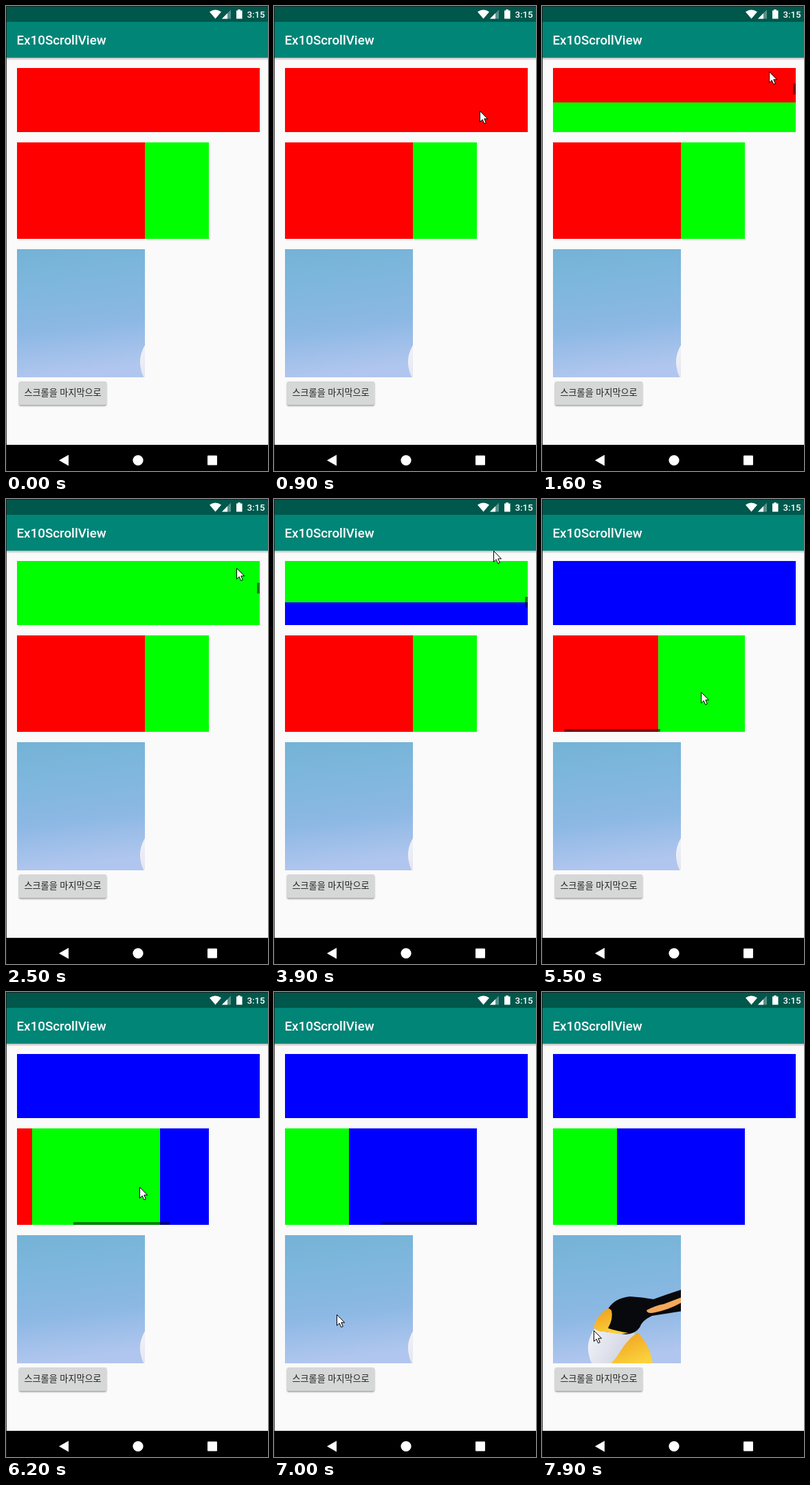
An HTML page for the animation above (8000 ms loop, 381x675 px).

```html
<!DOCTYPE html>
<html lang="ko">
<head>
<meta charset="utf-8">
<title>Scroll views</title>
<style>
html, body { margin: 0; width: 100%; height: 100%; overflow: hidden; background: #fafafa; }
svg { display: block; }
.ui { font-family: Roboto, "Noto Sans", sans-serif; font-weight: 500; fill: #fff; }
.ko { font-family: "Noto Sans CJK KR", "Noto Sans CJK", "Noto Sans CJK JP", sans-serif; fill: #212121; }
</style>
</head>
<body>
<svg id="stage" width="381" height="675" viewBox="0 0 381 675">
  <defs>
    <linearGradient id="drop" x2="0" y2="1">
      <stop stop-color="#000" stop-opacity=".26"/>
      <stop offset="1" stop-color="#000" stop-opacity="0"/>
    </linearGradient>
    <linearGradient id="sky" x2=".12" y2="1">
      <stop stop-color="#74b3d6"/>
      <stop offset=".35" stop-color="#80b7de"/>
      <stop offset=".65" stop-color="#8cb8e4"/>
      <stop offset="1" stop-color="#b0c6ee"/>
    </linearGradient>
    <linearGradient id="chest" x2="1" y2=".3">
      <stop stop-color="#f4f5fa"/>
      <stop offset="1" stop-color="#c3c7d8"/>
    </linearGradient>
    <linearGradient id="gold" x2=".5" y2="1">
      <stop stop-color="#ee9a1c"/>
      <stop offset="1" stop-color="#fbd13c"/>
    </linearGradient>
    <filter id="soft" x="-10%" y="-30%" width="120%" height="170%">
      <feGaussianBlur stdDeviation="1.1"/>
    </filter>
  </defs>

  <rect width="381" height="675" fill="#fafafa"/>
  <rect y="75" width="381" height="4" fill="url(#drop)"/>
  <rect width="381" height="23" fill="#00574b"/>
  <rect y="23" width="381" height="52" fill="#008577"/>
  <text class="ui" x="15.5" y="56" font-size="18.8">Ex10ScrollView</text>

  <g fill="#fff">
    <path d="M296 8.6Q304.5 2.4 313 8.6L304.5 18.5Z"/>
    <path d="M314 18.5H327V5.5Z" opacity=".35"/>
    <path d="M314 18.5H322V10.5Z"/>
    <path d="M335 6.5H337.3V5H340.7V6.5H343.5V18.5H335Z"/>
  </g>
  <text class="ui" x="350.5" y="17" font-size="13.2">3:15</text>

  <svg x="16" y="90" width="353" height="93">
    <g id="column">
      <rect width="353" height="186" fill="#f00"/>
      <rect y="186" width="353" height="186" fill="#0f0"/>
      <rect y="372" width="353" height="186" fill="#00f"/>
    </g>
    <rect id="barV" x="349" width="4" height="15.5"/>
  </svg>

  <svg x="16" y="198" width="279" height="140">
    <g id="row">
      <rect width="186" height="140" fill="#f00"/>
      <rect x="186" width="186" height="140" fill="#0f0"/>
      <rect x="372" width="186" height="140" fill="#00f"/>
    </g>
    <rect id="barH" y="136" width="139.5" height="4"/>
  </svg>

  <svg x="16" y="353" width="186" height="186">
    <rect width="186" height="186" fill="url(#sky)"/>
    <g id="photo">
      <g transform="translate(112 -353)">
        <path d="M78 486Q66 503 67 519Q68 532 74 542H165L132 492Z" fill="url(#chest)"/>
        <path d="M139 494Q124 505 115 520Q108 532 98 542H161Q159 515 139 494Z" fill="url(#gold)"/>
        <path d="M96 460Q106 444 128 442Q146 443 162 446Q184 438 206 431V463Q180 467 160 470Q145 477 142 487Q136 496 122 497L84 492Z" fill="#08090c"/>
        <path d="M97 459Q80 468 75 487Q80 494 92 493Q110 498 126 495Q108 492 96 488Q104 474 101 462Z" fill="url(#gold)"/>
        <path d="M152 462Q165 455 177 453L206 442V449Q186 461 165 465Q153 468 152 462Z" fill="#f4a85a"/>
      </g>
    </g>
  </svg>

  <rect x="19" y="546.5" width="127" height="34" rx="2" opacity=".4" filter="url(#soft)"/>
  <rect x="19" y="545" width="127" height="34" rx="2" fill="#d6d7d7"/>
  <text class="ko" x="26.5" y="566" font-size="13.1">스크롤을 마지막으로</text>

  <rect y="637" width="381" height="38"/>
  <g fill="#fff">
    <path d="M77 659.5L91 651.5V667.5Z"/>
    <circle cx="192" cy="659.5" r="7.6"/>
    <rect x="293" y="652.5" width="14" height="14" rx="1"/>
  </g>
  <path d="M.5 0V675M0 .5H381" stroke="#1a1a1a" opacity=".85"/>

  <path id="cursor" d="M.5 .5V16.2L4.1 12.8L6.7 18.6L9.3 17.5L6.8 11.8H11.6Z" fill="#fff" stroke="#000"/>
</svg>
<script>
const LOOP = 8000, STEP = 100;

// Pointer stops: time, x, y and the view dragged on the way there, if any.
const stops = [
  [100, 345, 140],
  [600, 291, 174],
  [900, 299, 152],
  [1100, 308, 91, "column"],
  [1300, 318, 170],
  [1600, 330, 95, "column"],
  [2200, 335, 154],
  [2500, 335, 100, "column"],
  [3200, 328, 69, "column"],
  [3500, 318, 166],
  [3900, 319, 75, "column"],
  [4400, 315, 169],
  [4900, 314, 89, "column"],
  [5400, 264, 280],
  [5900, 100, 280, "row"],
  [6300, 225, 284],
  [6600, 110, 305, "row"],
  [7000, 91, 468],
  [7500, 84, 491],
  [7700, 9, 488, "photo"],
  [7800, 128, 491],
  [7900, 75, 491, "photo"]
];

const $ = id => document.getElementById(id);
const clamp = v => Math.min(1, Math.max(0, v));

function move(el, x, y) {
  el.setAttribute("transform", `translate(${x} ${y})`);
}

// Walks the stops up to time t; every drag scrolls its view by the distance covered.
function poseAt(t) {
  let [, x, y] = stops[0];
  const scroll = { column: 0, row: 0, photo: 0 };
  for (let i = 1; i < stops.length && stops[i - 1][0] < t; i++) {
    const [t0, x0, y0] = stops[i - 1], [t1, x1, y1, view] = stops[i];
    const p = clamp((t - t0) / (t1 - t0));
    x = x0 + (x1 - x0) * p;
    y = y0 + (y1 - y0) * p;
    if (view) scroll[view] += view === "column" ? y0 - y : x0 - x;
  }
  return { x, y, scroll };
}

// A scroll bar shows from the first touch and fades out after the last.
function showBar(bar, view, t) {
  const first = stops.findIndex(s => s[3] === view);
  const last = stops.filter(s => s[3] === view).pop();
  const shown = t >= stops[first - 1][0] + STEP;
  bar.setAttribute("opacity", shown ? 0.5 * clamp((last[0] + 600 - t) / 300) : 0);
}

function draw(t) {
  const { x, y, scroll } = poseAt(t);
  move($("column"), 0, -scroll.column);
  move($("row"), -scroll.row, 0);
  move($("photo"), -scroll.photo, 0);
  move($("barV"), 0, scroll.column / 6);
  move($("barH"), scroll.row / 2, 0);
  showBar($("barV"), "column", t);
  showBar($("barH"), "row", t);
  move($("cursor"), Math.round(x), Math.round(y));
  $("cursor").setAttribute("visibility", t < stops[0][0] ? "hidden" : "visible");
}

const start = performance.now();
function tick() {
  const t = (performance.now() - start) % LOOP;
  draw(Math.floor(t / STEP) * STEP);
  requestAnimationFrame(tick);
}
tick();
</script>
</body>
</html>
```
